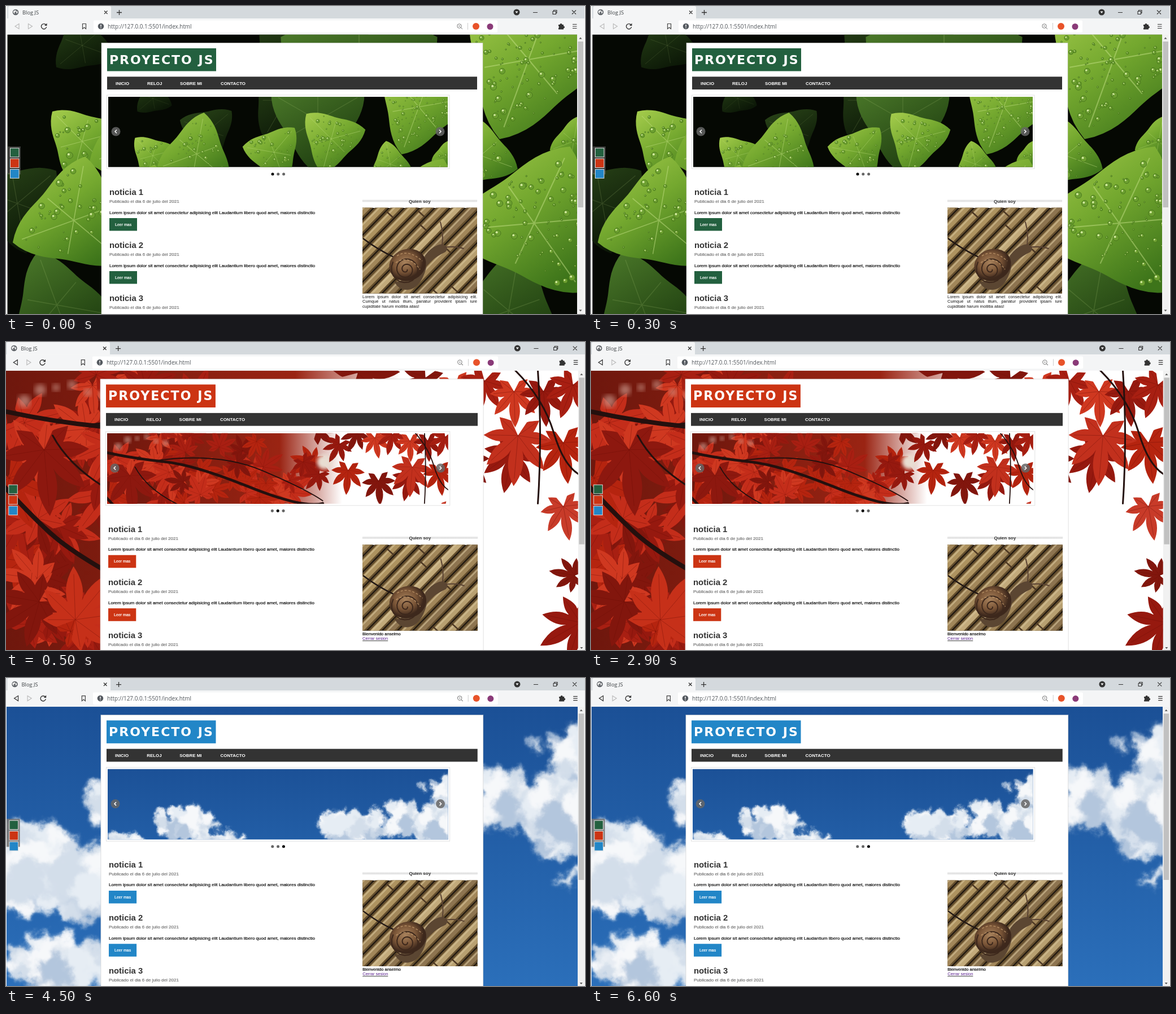
Animation, 1025 px wide and 546 px high, one loop 8000 ms. Source, as an HTML page:

```html
<!DOCTYPE html>
<html lang="es">
<head>
<meta charset="utf-8">
<title>Blog JS</title>
<style>
html, body { margin: 0; width: 100%; height: 100%; overflow: hidden; background: #fff; }
.scene {
  position: absolute; left: 0; top: 0; width: 1025px; height: 546px; opacity: 0;
  font-family: "Liberation Sans", Arial, sans-serif;
  animation: 8s step-end infinite;
}
.green { animation-name: first; }
.red { animation-name: second; }
.blue { animation-name: third; }
@keyframes first { 0% { opacity: 1 } 6.25%, 100% { opacity: 0 } }
@keyframes second { 0% { opacity: 0 } 6.25% { opacity: 1 } 56.25%, 100% { opacity: 0 } }
@keyframes third { 0% { opacity: 0 } 56.25%, 100% { opacity: 1 } }
.ui { font-family: "Open Sans", "Noto Sans", sans-serif; }
.logo { font-family: "DejaVu Sans", Verdana, sans-serif; font-weight: bold; letter-spacing: 2px; }
.bold { font-weight: bold; }
.dense { stroke-width: .22px; }
.about { font-size: 7.5px; line-height: 8.3px; text-align: justify; color: #111; }
</style>
</head>
<body>
<svg width="0" height="0" style="position:absolute">
  <defs>
    <linearGradient id="bright" x1="0" y1="0" x2=".7" y2="1"><stop offset="0" stop-color="#a6cd4d"/><stop offset=".5" stop-color="#74a82f"/><stop offset="1" stop-color="#3d741a"/></linearGradient>
    <linearGradient id="mid" x1="0" y1="0" x2=".6" y2="1"><stop offset="0" stop-color="#4c7a2a"/><stop offset="1" stop-color="#1d3c0f"/></linearGradient>
    <linearGradient id="dim" x1="0" y1="0" x2=".5" y2="1"><stop offset="0" stop-color="#2b4719"/><stop offset="1" stop-color="#0c1807"/></linearGradient>
    <linearGradient id="sky" x1="0" y1="0" x2="0" y2="1"><stop offset="0" stop-color="#1b5096"/><stop offset="1" stop-color="#2b6fba"/></linearGradient>
    <linearGradient id="autumn"><stop offset="0" stop-color="#6e170d"/><stop offset=".5" stop-color="#9a2413"/><stop offset=".68" stop-color="#fff"/></linearGradient>
    <radialGradient id="shell" cx=".45" cy=".4"><stop offset="0" stop-color="#a8825c"/><stop offset=".6" stop-color="#7a5537"/><stop offset="1" stop-color="#3d281c"/></radialGradient>
    <filter id="fluff" x="-15%" y="-15%" width="130%" height="130%">
      <feGaussianBlur stdDeviation="4" result="soft"/>
      <feTurbulence type="fractalNoise" baseFrequency=".04" numOctaves="4" seed="4"/>
      <feDisplacementMap in="soft" scale="30" xChannelSelector="R" yChannelSelector="G"/>
    </filter>
    <filter id="blur"><feGaussianBlur stdDeviation="5"/></filter>
  </defs>
</svg>
<script>
let seed;
const rnd = () => (seed = seed * 16807 % 2147483647) / 2147483647;
const pick = list => list[Math.floor(rnd() * list.length)];
const times = (n, fn) => Array.from({ length: n }, (_, i) => fn(i)).join('');
const polar = (x, y, r, deg) => {
  const a = deg * Math.PI / 180;
  return `${(x + Math.cos(a) * r).toFixed(1)} ${(y + Math.sin(a) * r).toFixed(1)}`;
};
const rect = (x, y, w, h, fill, more = '') => `<rect x="${x}" y="${y}" width="${w}" height="${h}" fill="${fill}" ${more}/>`;
const disc = (x, y, r, fill, more = '') => `<circle cx="${x}" cy="${y}" r="${r}" fill="${fill}" ${more}/>`;
const line = (d, color, w = 1, more = '') => `<path d="${d}" fill="none" stroke="${color}" stroke-width="${w}" ${more}/>`;
const shape = (d, fill) => `<path d="${d}" fill="${fill}"/>`;
const text = (x, y, size, str, fill, kind = 'dense') =>
  `<text x="${x}" y="${y}" font-size="${size}" fill="${fill}" class="${kind}" ${kind == 'dense' ? `stroke="${fill}"` : ''}>${str}</text>`;
// a clipped picture that keeps the page coordinates
const photo = (x, y, w, h, body) => `<svg x="${x}" y="${y}" width="${w}" height="${h}" viewBox="${x} ${y} ${w} ${h}">${body}</svg>`;

// ---- ivy: a three-pointed leaf with veins and water drops
function ivy(x, y, r, turn, tone, drops = 0) {
  const reach = deg => r * (1 - .38 * Math.abs(Math.sin(1.5 * deg * Math.PI / 180)));
  const edge = times(60, i => `${i ? 'L' : 'M'}${polar(x, y, reach(i * 6), i * 6 + turn)}`);
  const veins = times(6, i => `M${x} ${y}L${polar(x, y, reach(i * 60) * .85, i * 60 + turn)}`);
  return shape(edge + 'Z', `url(#${tone})`) + line(veins, '#cbe58c', r / 70, `opacity="${drops ? .45 : .15}"`) +
    times(drops, () => {
      const deg = rnd() * 360, size = 1 + 5 * rnd() ** 2;
      const [dx, dy] = polar(x, y, reach(deg) * Math.sqrt(rnd()) * .9, deg + turn).split(' ');
      return disc(dx, dy, size, '#6c9f30', 'stroke="#416f18" stroke-width=".8"') +
        disc(dx - size * .3, dy - size * .3, size * .35, '#d3eaa0');
    });
}
const ivyWall = () => rect(0, 50, 1025, 496, '#050803') +
  ivy(135, 70, 60, 20, 'dim') + ivy(20, 350, 90, 200, 'dim') + ivy(300, 165, 90, 320, 'dim') +
  ivy(530, 75, 130, 0, 'dim') + ivy(625, 135, 160, 330, 'mid') + ivy(90, 530, 100, 250, 'mid') +
  ivy(890, 540, 110, 280, 'mid') + ivy(135, 240, 75, 225, 'bright', 20) + ivy(265, 235, 125, 280, 'bright', 50) +
  ivy(495, 230, 95, 190, 'bright', 40) + ivy(665, 190, 105, 345, 'bright', 50) + ivy(120, 380, 115, 160, 'bright', 55) +
  ivy(925, 95, 150, 110, 'bright', 110) + ivy(1005, 240, 45, 160, 'bright', 8) + ivy(935, 385, 150, 55, 'bright', 95) +
  ivy(840, 265, 70, 260, 'bright', 20);

// ---- maple: seven pointed lobes
const reds = ['#a81f12', '#c42d1a', '#96190f', '#b5240f', '#82160d', '#cf3820'];
function maple(x, y, r, turn, fill = pick(reds)) {
  const lobes = [-130, -86, -42, 0, 42, 86, 130];
  const at = (deg, len) => polar(x, y, len * r, deg + turn);
  const len = a => 1.02 - Math.abs(a) / 260;
  const edge = lobes.map(a =>
    `L${at(a - 21, .32)}Q${at(a - 19, len(a) * .68)} ${at(a, len(a))}Q${at(a + 19, len(a) * .68)} ${at(a + 21, .32)}`);
  return shape(`M${x} ${y}${edge.join('')}Z`, fill) +
    line(lobes.map(a => `M${x} ${y}L${at(a, len(a) * .85)}`).join(''), '#6d0e06', .8, 'opacity=".5"');
}
const scatter = (n, x, y, w, h, r) => times(n, () => maple(x + rnd() * w, y + rnd() * h, r * (.7 + rnd() * .6), rnd() * 360));
const twig = (d, w) => line(d, '#24100e', w, 'stroke-linecap="round"');
const glow = (x, y, r) => disc(x, y, r, '#c99488', 'filter="url(#blur)" opacity=".7"');

const mapleWall = () => rect(0, 50, 1025, 496, 'url(#autumn)') +
  scatter(40, 0, 60, 180, 480, 75) + scatter(40, 150, 50, 480, 220, 70) +
  times(6, i => glow(35 + i * 28, 72 + rnd() * 35, 6 + rnd() * 9)) + maple(70, 190, 115, 85, '#8d180f') +
  maple(125, 490, 110, 310, '#c63019') +
  disc(645, 150, 22, '#e8ddd2', 'filter="url(#blur)"') +
  times(7, i => maple(690 + i * 52, 62 + rnd() * 40, 62, 70 + rnd() * 50)) +
  times(4, i => maple(715 + i * 90, 165 + rnd() * 50, 72, 75 + rnd() * 40)) +
  maple(905, 165, 88, 95, '#c2301d') + maple(985, 290, 60, 80, '#c83b29') +
  maple(1005, 412, 45, 190) + maple(1015, 495, 80, 150) +
  twig('M-5 121Q80 140 170 149T420 223T640 273', 8) + twig('M-5 250Q60 320 90 345T175 402', 8) +
  twig('M140 147Q330 120 460 175T640 265', 3) + twig('M85 165Q120 230 210 275', 3) +
  twig('M900 50Q950 100 968 160T1015 235', 3) + twig('M940 50Q948 170 940 285', 3);

// ---- clouds: banks of seeded puffs, shaded below
const cloud = (x, y, w, h, n = 34) => times(n, i => {
  const k = Math.sqrt(rnd()), a = rnd() * 6.28, r = h * (.2 + .32 * (1 - k));
  const py = y + Math.sin(a) * k * h * .8;
  const white = pick(['#f6f8fa', '#e6edf4', '#d3deea']);
  return disc(x + Math.cos(a) * k * w * .9, py, r, py > y && i % 3 == 0 ? '#b3c6dd' : white);
});
const skyWall = () => rect(0, 50, 1025, 496, 'url(#sky)') + '<g filter="url(#fluff)">' +
  cloud(40, 335, 95, 90, 60) + cloud(145, 355, 90, 80, 50) + cloud(230, 225, 105, 60, 45) + cloud(330, 275, 110, 35) +
  cloud(100, 505, 105, 60, 50) + cloud(720, 240, 105, 65, 50) + cloud(880, 215, 120, 58, 50) + cloud(985, 240, 80, 85, 50) +
  cloud(1000, 130, 35, 60, 16) + cloud(950, 105, 25, 30, 5) + cloud(1005, 355, 30, 25, 8) + '</g>';

// ---- bamboo and snail
const canes = ['#b8a071', '#a2875a', '#c2aa7b', '#8d7450', '#ae9360'];
const snail = () => rect(631, 358, 203, 152, '#211911') +
  times(15, i => {
    const x = 470 + i * 27, d = `M${x} 530L${x + 185} 340`, k = rnd();
    return line(d, '#66502f', 17) + line(d, pick(canes), 11) +
      line(`M${x - 4} 530L${x + 181} 340`, '#d9c79d', 2.5, 'opacity=".6"') +
      line(`M${x + 185 * k - 7} ${524 - 190 * k}l13 12`, '#4e3924', 2.5);
  }) +
  line('M632 412Q655 430 688 446', '#211714', 2.5) +
  shape('M688 490Q735 480 742 442Q755 424 772 422Q786 426 778 436Q755 447 745 460Q738 490 722 500Q700 510 688 490Z', '#5b4632') +
  line('M772 424Q775 405 769 383M776 428Q795 425 810 430', '#5a4332', 2, 'stroke-linecap="round"') +
  '<ellipse cx="711" cy="459" rx="33" ry="28" fill="url(#shell)" transform="rotate(-18 711 459)"/>' +
  line(times(50, i => `${i ? 'L' : 'M'}${polar(708, 467, 2 + i * .5, i * 19)}`), '#3d281c', 2) +
  line('M692 443Q712 430 737 452M690 455Q713 440 733 467', '#c9a273', 1.5, 'stroke-dasharray="4 3" opacity=".7"');

// ---- browser window
const chrome = back => rect(2, 0, 1022, 22, '#d4d9dd') + rect(2, 22, 1022, 28.5, '#f4f5f6') +
  shape('M4 22V3Q4 0 7 0H183Q186 0 186 3V22Z', '#f4f5f6') + rect(155, 25.5, 715, 21.5, '#fff', 'rx="2"') +
  disc(17, 11, 5.3, '#5f6368') + shape('M13 9l4 -2 1 3 -3 1 1 3 -3 -2ZM19 8l2 3 -2 3 -1 -3Z', '#eee') +
  text(29, 14.5, 9.3, 'Blog JS', '#3c4043', 'ui') +
  line('M174 8.5l5.5 5.5m0 -5.5l-5.5 5.5M196 11.5h9m-4.5 -4.5v9', '#333', 1.3) +
  disc(904, 11, 5.5, '#333') + shape('M901.5 9.5h5l-2.5 3.5Z', '#fff') +
  line('M933 11.5h8M968 9.5h5.5v5h-5.5ZM969.5 9.5v-2h5.5v5h-1.5M1002 7.5l7 7m0 -7l-7 7', '#333', 1.1) +
  line('M23 31.5v9l-7 -4.5Z', back, 1.2) + line('M39.5 31.5v9l7 -4.5Z', '#bbb', 1.2) +
  line('M70.8 33.5A4.6 4.6 0 1 0 71.6 37', '#333', 1.4) + shape('M72.5 30.5v4.5h-4.5Z', '#333') +
  line('M135.5 31.5h6v9l-3 -2.5 -3 2.5Z', '#444', 1.2) +
  disc(168, 36, 5.3, '#555a60') + rect(167.3, 32.8, 1.4, 4, '#fff') + rect(167.3, 38, 1.4, 1.4, '#fff') +
  text(180, 39.5, 9.9, 'http://127.0.0.1:5501/index.html', '#50555a', 'ui') +
  line('M805 38l3 3M806.2 35.5a3.7 3.7 0 1 1 -7.4 0a3.7 3.7 0 1 1 7.4 0M801 35.5h3', '#777') +
  line('M817.5 30v12', '#ccc') + disc(832, 36, 6, '#e8532a') + disc(857, 36.5, 5.5, '#8a3a78') +
  shape('M978 33h2.5a2 2 0 0 1 4 0h2.5v2.5a2 2 0 0 1 0 4v2h-9v-2.5a2 2 0 0 0 0 -3.5Z', '#333') +
  line('M1003 32.5h7.5m-7.5 3.5h7.5m-7.5 3.5h7.5', '#333', 1.2) +
  rect(1011, 50.5, 12, 496, '#f1f1f1') + rect(1012.5, 63, 9.5, 294, '#c1c1c1') +
  shape('M1014.5 58.5l2.5 -3 2.5 3ZM1014.5 538.5l2.5 3 2.5 -3Z', '#555');

// ---- page
const news = (n, color) => `<g transform="translate(0 ${(n - 1) * 94})">` +
  text(183, 335, 14.8, `noticia ${n}`, '#333', 'bold') +
  text(183, 349, 8, 'Publicado el dia 6 de julio del 2021', '#777') +
  text(183, 368.5, 8, 'Lorem ipsum dolor sit amet consectetur adipisicing elit Laudantium libero quod amet, maiores distinctio', '#111') +
  rect(183, 376, 49, 22.5, color) + text(193, 389.7, 7, 'Leer mas', '#fff') + '</g>';
const arrow = (x, dir) => disc(x, 222.5, 8, '#666', 'opacity=".85"') +
  line(`M${x - dir * 1.5} 219.5l${dir * 3} 3l${-dir * 3} 3`, '#fff', 1.5);
const colors = ['#23603f', '#cc3413', '#2286c7'];
const menu = [[194, 'INICIO'], [250, 'RELOJ'], [308, 'SOBRE MI'], [380, 'CONTACTO']];
const guest = text(631, 518, 7.5, 'Bienvenido anselmo', '#111') +
  `<g text-decoration="underline">${text(631, 526, 7.5, 'Cerrar sesion', '#551a8b', 'link')}</g>`;
const about = `<foreignObject x="631" y="512" width="203" height="34"><div xmlns="http://www.w3.org/1999/xhtml" class="about">Lorem ipsum dolor sit amet consectetur adipisicing elit. Cumque ut natus illum, pariatur provident ipsam iure cupiditate harum mollitia alias!</div></foreignObject>`;

function scene(i, name, wall, zoom, dx, shade) {
  const color = colors[i];
  seed = 41;
  const snailPic = snail();
  // the slider shows the upper part of the wallpaper at a smaller size
  const strip = `<use href="#${name}" transform="translate(181 161) scale(.596) translate(-2.5 -65)"/>`;
  return `<svg class="scene ${name}" viewBox="0 0 1025 546"><rect width="1025" height="546" fill="#fff"/>
  <g transform="translate(${dx} 0) scale(${zoom})">` +
    photo(2.5, 50.5, 1008.5, 496, `<g id="${name}">${wall()}</g>`) + chrome(i ? '#333' : '#bbb') +
    rect(2.5, 249, 23.5, 49.5, '#777', `opacity="${shade}"`) +
    colors.map((c, k) => rect(7.5, 252 + k * 18.8, 15.5, 15.7, c, 'stroke="#ddd"')).join('') +
    rect(169, 65.5, 675, 490, '#fff', 'stroke="#ccc" stroke-width=".6"') +
    rect(179, 75, 193, 40.5, color) + text(183, 102.5, 22, 'PROYECTO JS', '#fff', 'logo') +
    rect(179, 125.3, 655, 22.7, '#333') +
    menu.map(([x, s]) => text(x, 139.6, 7.9, s, '#fff', 'bold')).join('') +
    rect(178.5, 158, 606.5, 130.5, '#fff', 'stroke="#e2e2e2"') + photo(181, 161, 601, 124.5, strip) +
    arrow(194.5, -1) + arrow(768.5, 1) +
    times(3, k => disc(472 + k * 9.8, 298, 2.5, k == i ? '#000' : '#666')) +
    [1, 2, 3].map(n => news(n, color)).join('') +
    rect(631, 343.5, 203, 4, '#ececec') + line('M631 345.5H834', '#ddd', 3, 'stroke-dasharray="1 1"') +
    text(713, 348.5, 8, 'Quien soy', '#333', 'bold') +
    photo(631, 357.5, 203, 152, snailPic) + (i ? guest : about) + '</g></svg>';
}

document.body.insertAdjacentHTML('beforeend',
  scene(0, 'green', ivyWall, 1, 0, .45) +
  scene(1, 'red', mapleWall, 1.0046, -2.8, 0) +
  scene(2, 'blue', skyWall, 1.0027, -1.5, .9));
</script>
</body>
</html>
```
